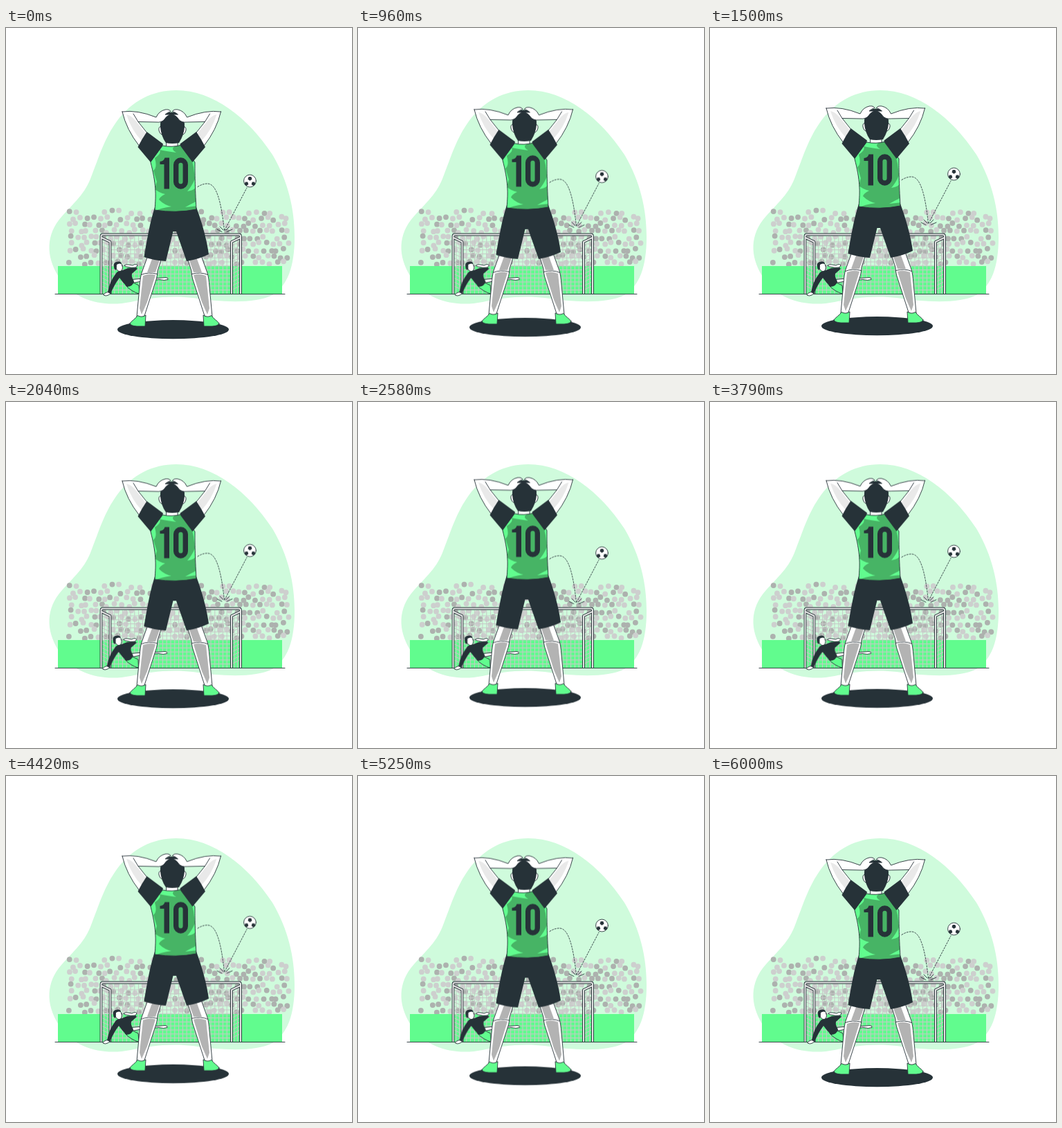
Write an HTML page that moves like this. It is 500x500 px and loops after 6040 ms.

```html
<!DOCTYPE html>
<html lang="en">
<head>
<meta charset="utf-8">
<title>Missed shot</title>
<style>
  html, body { margin: 0; width: 100%; height: 100%; overflow: hidden; background: #fff; }
  svg { display: block; width: 100%; height: 100%; }
  .line { stroke: #263238; stroke-width: .9; stroke-linejoin: round; stroke-linecap: round; }
  .white { fill: #fff; }
  .none { fill: none; }
  .dark { fill: #263238; }
  .green { fill: #61fc8e; }
  .shade { fill: #b3b3b3; }
  .net { fill: none; stroke: #c7c7c7; stroke-width: 1; }
  .post { fill: none; stroke: #263238; stroke-width: 3.8; stroke-linejoin: round; }
  .post.inner { stroke: #e2e2e2; stroke-width: 2; }

  /* 6 s of motion, then a 40 ms rest before the loop restarts */
  .player, .ball, .keeper { animation: 6040ms linear infinite; }
  .player { animation-name: float; }
  .ball { animation-name: bounce; }
  .keeper { animation-name: sway; }
  @keyframes float {
    0%, 99.338%, 100% { transform: translateY(0); }
    49.669% { transform: translateY(-10px); }
  }
  @keyframes bounce {
    0%, 49.669%, 99.338%, 100% { transform: translateY(0); }
    24.834%, 74.503% { transform: translateY(-10px); }
  }
  @keyframes sway {
    0%, 99.338%, 100% { transform: translateX(0); }
    49.669% { transform: translateX(-2px); }
  }
</style>
</head>
<body>
<svg viewBox="0 0 500 500">
  <defs>
    <path id="shirt" d="M226 170Q240 173 254 169L273 194C273 210 273 228 275 262Q246 268 215 263C217 240 217 225 209 194Z"/>
    <clipPath id="shirtClip"><use href="#shirt"/></clipPath>
    <path id="posts" d="M137.500 384V301Q137.500 298.500 140 298.500H336.500Q339 298.500 339 301V384M138 303L150.500 309V384M338.500 303L326 309V384"/>
  </defs>

  <path fill="#cffbdc" d="M246 90C300 90 350 130 385 183C408 222 417 262 417 302C417 345 407 372 385 386C360 399 310 396 270 390C240 386 205 390 180 396C140 404 100 393 80 365C58 335 57 303 76 278C95 255 112 243 122 218C135 185 142 160 160 135C182 105 212 90 246 90Z"/>
  <g id="crowd"></g>
  <rect class="green" x="75" y="344" width="324" height="40.500"/>

  <path id="net" class="net"/>
  <use href="#posts" class="post"/>
  <use href="#posts" class="post inner"/>
  <path class="line" d="M71 384.500H403"/>

  <g class="keeper">
    <path class="line green" d="M173 372Q181 381 193 384.300L192 372L184 368Z"/>
    <path class="line white" d="M182 363.500Q200 361 220 361.500L231 360.500Q235 361 234 363.500Q229 365.500 222 363.500Q202 364 185 368Z"/>
    <path class="line white" d="M149 381Q141 383 141 386Q144 388 148 386L152 383Z"/>
    <path class="dark" d="M164 351Q170 350 176 347L188 346L190 348L182 355Q181 360 185 366Q184 373 175 374Q169 368 164 361Q157 370 151 384L147 382Q150 366 158 356Q160 352 164 351Z"/>
    <path class="line white" d="M171 343Q174 341 177 342L183 343Q188 340 190 343L188 346Q182 347 174 345Z"/>
    <ellipse class="line white" cx="163.500" cy="345" rx="4.800" ry="6.800" transform="rotate(-14 163.500 345)"/>
    <path class="dark" d="M156 345Q154 338 162 337.500Q167 337 167 341Q163 339.500 160 342Q160 347 159 350Q156 349 156 345Z"/>
  </g>

  <g class="ball">
    <path class="none line" stroke-dasharray="2 2" d="M277 229.500Q285 224.500 292 225C304 226 311 250 315.500 293L348 231"/>
    <path class="none line" d="M305 291L312 294.500M309 287L314 292M327 291L319 294.500M323 287L318 292"/>
    <circle class="line white" cx="352.500" cy="221" r="8.900"/>
    <g id="patches" class="dark"></g>
  </g>

  <g class="player">
    <ellipse class="dark" cx="241.500" cy="435.700" rx="80.500" ry="13.600"/>

    <g id="leg">
      <path class="line white" d="M205 329L196 354Q194 360 193 374L189 417Q194 421 200 416L217.500 362Q219 355 219 351L225 332Z"/>
      <path class="shade" d="M212 331L223 333L216 353L204 353Z"/>
      <path class="shade" d="M198 358Q208 354 216 357L204 396L196 414L193 405Z"/>
      <path class="line none" d="M195.500 356.500Q206 352 218.500 355.500"/>
      <path class="line green" d="M179 427C181 423 188 420 190 415.500Q196 419 202 415L201 431H189Q180 430.500 179 427Z"/>
    </g>
    <use href="#leg" transform="translate(487 0) scale(-1 1)"/>

    <path class="dark" d="M215 259H275C283 280 290 305 293 327Q279 334 261 337L246 294H241.500L231 337Q214 336 199.500 331C204 304 208 281 215 259Z"/>

    <path class="line white" d="M232 160H248V173Q240 175 232 172Z"/>
    <g clip-path="url(#shirtClip)">
      <rect x="205" y="165" width="75" height="102" fill="#47b465"/>
      <g class="green">
        <path d="M207 192L226 169L246 170Q236 174 246 180Q231 178 222 176Q225 181 215 188Q219 202 213 206L218 222L214 235Z"/>
        <path d="M279 188L262 176Q261 184 268 188L271 201L273 218Q269 228 262 236Q270 235 274 231V251Q268 254 259 259L278 257Z"/>
        <path d="M213 231Q222 239 230 240Q222 244 221 248Q229 256 239 258Q224 260 213 265Z"/>
      </g>
    </g>
    <use href="#shirt" class="line none"/>
    <path class="dark" d="M229.500 187.500H236V232.500H228.500V197H222.500V193Q228 192.500 229.500 187.500Z"/>
    <rect class="none" x="245.700" y="191" width="13.600" height="38" rx="6.800" stroke="#263238" stroke-width="7.400"/>

    <path class="line white" d="M225 142Q220 142 221 148Q223 155 227 154ZM255 142Q261 142 260 148Q258 155 254 154Z"/>
    <path class="dark" d="M223 143Q222 122 240 121.500Q259 122 258 143Q257 155 250 166Q240 168 231 166Q224 156 223 143Z"/>

    <g id="arm">
      <path class="line white" d="M168 121Q190 118 217 129Q221 120 230 118Q236 117 238 120.500Q233 122 230 125L237 125Q231 128 229 132Q225 137 217 136L191 135.500L205 153L193 171Q174 147 168 121Z"/>
      <path fill="#e9e9e9" d="M174 125Q181 126 188 135L203 154L196 163Q181 147 174 125Z"/>
      <path class="line none" d="M184 124L191 135.500"/>
      <path class="dark" d="M203.500 150L227 167.500L226 171L209 194L190.500 172Q196 161 203.500 150Z"/>
    </g>
    <use href="#arm" transform="translate(478.500 0) scale(-1 1)"/>
  </g>
</svg>
<script>
  const $ = id => document.getElementById(id);

  function add(parent, tag, attrs) {
    const el = document.createElementNS('http://www.w3.org/2000/svg', tag);
    for (const key in attrs) el.setAttribute(key, attrs[key]);
    parent.append(el);
  }

  let seed = 11;
  const rand = () => (seed = (seed * 16807) % 2147483647) / 2147483647;
  const jitter = size => (rand() - .5) * size;

  // Crowd: staggered rows with loose spacing, thinner along the top
  for (let row = 0; row < 9; row++) {
    for (let x = 92 + (row % 2) * 5; x < 408; x += 10) {
      const tone = rand() < .5 ? '#adb1ae' : '#cdcfce';
      const cx = x + jitter(5), cy = 266 + row * 9.2 + jitter(5);
      if (rand() < (row ? .9 : .55)) add($('crowd'), 'circle', { cx, cy, r: 3.9, fill: tone });
    }
  }

  // Net: square back panel, slanted strips at the sides
  const cell = 5.8;
  let mesh = '';
  for (let x = 151; x <= 326; x += cell) mesh += `M${x} 301V384`;
  for (let y = 309; y < 384; y += cell) mesh += `M138 ${y - 6}L151 ${y}H326L338.5 ${y - 6}`;
  for (const x of [142, 146.500, 330, 334.500]) mesh += `M${x} 305V384`;
  $('net').setAttribute('d', mesh);

  // Ball: one pentagon in the middle, five near the rim
  function pentagon(cx, cy, r, turn) {
    const points = [0, 1, 2, 3, 4].map(i => {
      const a = turn + i * Math.PI * .4;
      return [cx + r * Math.sin(a), cy - r * Math.cos(a)];
    });
    add($('patches'), 'polygon', { points: points.join(' ') });
  }
  pentagon(352.5, 217.5, 3.2, Math.PI);
  for (const side of [-1, 1]) pentagon(352.5 + side * 5, 225, 3, side * .6);
</script>
</body>
</html>
```
